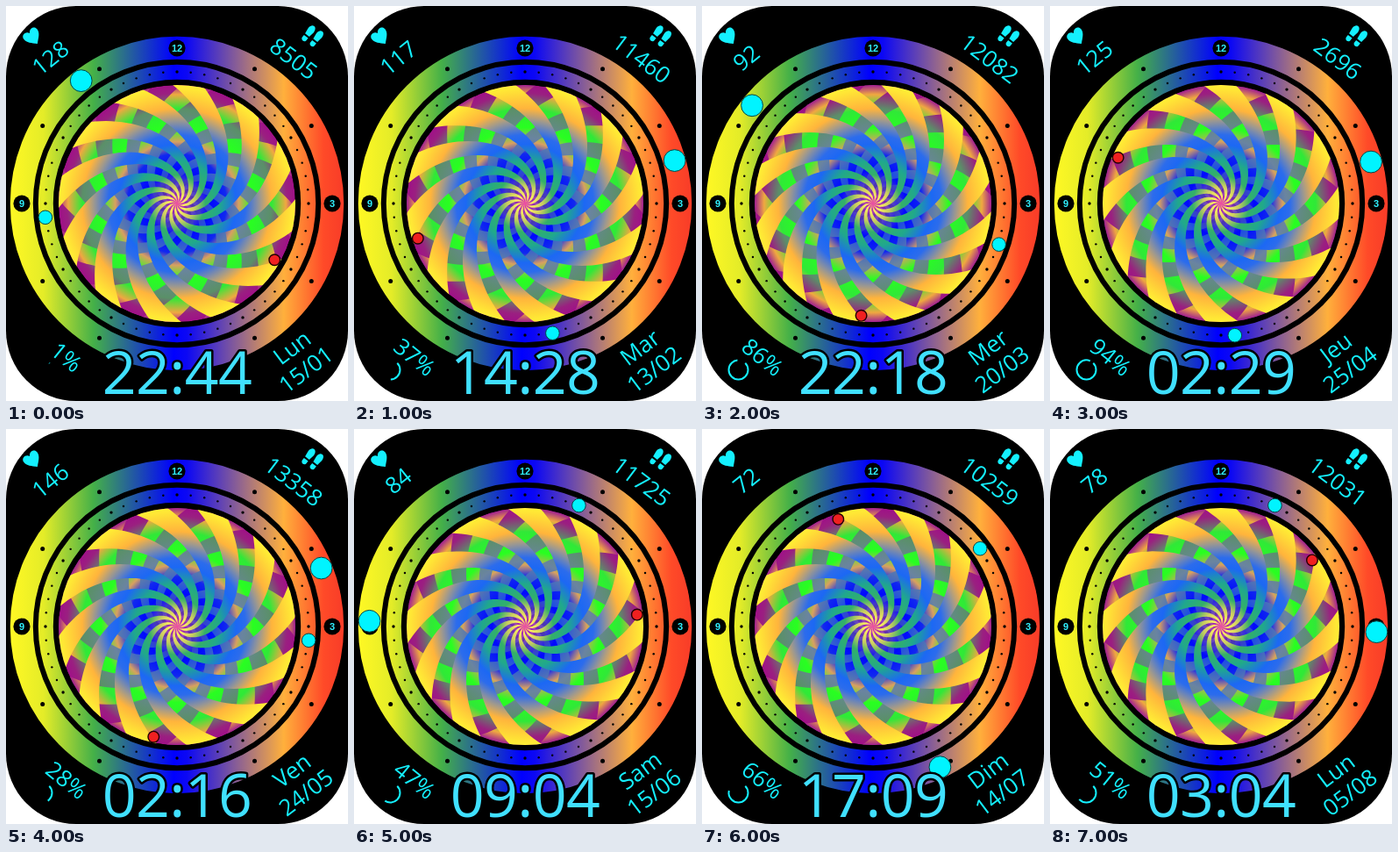
Recreate the animation shown at these times as an HTML page. Size 390 px wide and 450 px high, loop 8000 ms.

```html
<!DOCTYPE html>
<html lang="fr">
<head>
<meta charset="utf-8">
<title>Watch face</title>
<style>
  html, body { margin: 0; width: 100%; height: 100%; overflow: hidden; background: #fff; }
  svg { display: block; width: 390px; height: 450px; }
  text { font-family: "Open Sans", "Noto Sans", sans-serif; text-anchor: middle; }
  .info { font-size: 26px; fill: #14f0ff; }
  .mark { font: bold 11px Arial, "Liberation Sans", sans-serif; fill: #30f0ff; }
  #time { font-size: 68px; letter-spacing: -.6px; fill: #40e0ff; stroke: #000; stroke-width: 5px; stroke-linejoin: round; paint-order: stroke; }
</style>
</head>
<body>
<svg viewBox="0 0 390 450">
  <defs>
    <linearGradient id="rainbow" gradientUnits="userSpaceOnUse" x1="5" y1="0" x2="385" y2="0">
      <stop offset="0" stop-color="#fff824"/>
      <stop offset=".1" stop-color="#e4ec28"/>
      <stop offset=".25" stop-color="#44b048"/>
      <stop offset=".49" stop-color="#0000ff"/>
      <stop offset=".53" stop-color="#0c08f4"/>
      <stop offset=".82" stop-color="#ffb03c"/>
      <stop offset=".94" stop-color="#ff4a28"/>
      <stop offset="1" stop-color="#f83c28"/>
    </linearGradient>
    <radialGradient id="base" gradientUnits="userSpaceOnUse" cx="0" cy="0" r="135">
      <stop offset="0" stop-color="#e020b0"/>
      <stop offset=".14" stop-color="#5030b0"/>
      <stop offset=".3" stop-color="#2050e0"/>
      <stop offset=".55" stop-color="#6a84a0"/>
      <stop offset=".8" stop-color="#5a9068"/>
      <stop offset=".93" stop-color="#9a2080"/>
      <stop offset="1" stop-color="#a01088"/>
    </radialGradient>
    <radialGradient id="under" gradientUnits="userSpaceOnUse" cx="0" cy="0" r="135">
      <stop offset="0" stop-color="#f040a0"/>
      <stop offset=".15" stop-color="#6048c0"/>
      <stop offset=".28" stop-color="#0008ff"/>
      <stop offset=".42" stop-color="#1028f0"/>
      <stop offset=".52" stop-color="#d8a060"/>
      <stop offset=".64" stop-color="#28ff20"/>
      <stop offset=".8" stop-color="#30e838"/>
      <stop offset=".92" stop-color="#f0a840"/>
      <stop offset="1" stop-color="#a02090"/>
    </radialGradient>
    <radialGradient id="over" gradientUnits="userSpaceOnUse" cx="0" cy="0" r="135">
      <stop offset="0" stop-color="#f060a0"/>
      <stop offset=".06" stop-color="#fff060"/>
      <stop offset=".15" stop-color="#c8cc60"/>
      <stop offset=".24" stop-color="#34b068"/>
      <stop offset=".36" stop-color="#20a88c"/>
      <stop offset=".5" stop-color="#1c68f4"/>
      <stop offset=".58" stop-color="#2c6cec"/>
      <stop offset=".7" stop-color="#9c9890"/>
      <stop offset=".8" stop-color="#ffb43c"/>
      <stop offset="1" stop-color="#fff034"/>
    </radialGradient>
    <clipPath id="disc"><circle r="135"/></clipPath>
  </defs>

  <rect width="390" height="450" rx="80"/>

  <g transform="translate(195 225)">
    <circle r="177.2" fill="none" stroke="url(#rainbow)" stroke-width="26" id="outer"/>
    <circle r="149.7" fill="none" stroke="url(#rainbow)" stroke-width="17" id="inner"/>
    <g id="dots"></g>
    <g clip-path="url(#disc)">
      <circle r="135" fill="url(#base)"/>
      <path id="back" fill="url(#under)"/>
      <path id="front" fill="url(#over)"/>
    </g>
    <circle id="sec" r="6.3" fill="#f02020" stroke="#200" stroke-width="1.4"/>
    <circle id="min" r="7.8" fill="#00f4ff" stroke="#044" stroke-width="1"/>
    <circle id="hour" r="12.4" fill="#00f4ff" stroke="#044" stroke-width="1"/>
  </g>

  <g fill="#14f0ff">
    <path transform="translate(30 35) rotate(-36)" d="M0 10C-5 5-9.500 2-9.500-3.500C-9.500-9-2.500-10 0-5C2.500-10 9.500-9 9.500-3.500C9.500 2 5 5 0 10Z"/>
    <g transform="translate(349 35) rotate(38)">
      <path id="shoe" transform="translate(-5.500 -1)" d="M-4-4C-4-12 4-12 4-4L3 3H-3ZM-3 5H3V8C3 12-3 12-3 8Z"/>
      <path transform="translate(5.500 -2)" d="M-4-4C-4-12 4-12 4-4L3 3H-3ZM-3 5H3V8C3 12-3 12-3 8Z"/>
    </g>
  </g>
  <circle id="ring" r="11" transform="translate(41.500 414.500) rotate(-45)" pathLength="100" fill="none" stroke="#14f0ff" stroke-width="2"/>
  <g class="info">
    <text id="pulse" transform="translate(50.500 59) rotate(-39)" y="9.300"></text>
    <text id="steps" transform="translate(328 60) rotate(37)" y="9.300"></text>
    <text id="power" transform="translate(69 400) rotate(39)" y="9.300"></text>
    <text id="day" transform="translate(326 389) rotate(-37)" y="9.300"></text>
    <text id="date" transform="translate(342 414) rotate(-37)" y="9.300"></text>
  </g>
  <text id="time" x="195" y="442"></text>
</svg>

<script>
const $ = id => document.getElementById(id);
const TURN = 2 * Math.PI, ARMS = 12, STEP = 1000;

// time, seconds, pulse, steps, day, date, battery
const states = [
  ['22:44', 20, 128, 8505, 'Lun', '15/01', 1],
  ['14:28', 42, 117, 11460, 'Mar', '13/02', 37],
  ['22:18', 31, 92, 12082, 'Mer', '20/03', 86],
  ['02:29', 49, 125, 2696, 'Jeu', '25/04', 94],
  ['02:16', 32, 146, 13358, 'Ven', '24/05', 28],
  ['09:04', 14, 84, 11725, 'Sam', '15/06', 47],
  ['17:09', 57, 72, 10259, 'Dim', '14/07', 66],
  ['03:04', 9, 78, 12031, 'Lun', '05/08', 51]
];

// Clock position: a is a fraction of a full turn from 12 o'clock.
const polar = (r, a) => [r * Math.sin(a * TURN), -r * Math.cos(a * TURN)];

function put(el, r, a) {
  const [x, y] = polar(r, a);
  el.setAttribute('cx', x.toFixed(2));
  el.setAttribute('cy', y.toFixed(2));
}

function add(tag, attrs, text = '') {
  const el = document.createElementNS('http://www.w3.org/2000/svg', tag);
  for (const k in attrs) el.setAttribute(k, attrs[k]);
  el.textContent = text;
  $('dots').append(el);
  return el;
}

// Wedges twisted along a spiral that straightens at the centre.
function swirl(dir, width) {
  const bend = r => -dir * 1.35 * Math.log(1 + r / 22) / TURN;
  const point = (r, a) => polar(r, a + bend(r)).map(v => v.toFixed(1)).join(' ');
  let d = '';
  for (let i = 0; i < ARMS; i++) {
    const pts = [];
    for (let r = 0; r <= 144; r += 4) pts.push(point(r, i / ARMS));
    for (let r = 144; r > 0; r -= 4) pts.push(point(r, (i + width) / ARMS));
    d += 'M' + pts.join('L') + 'Z';
  }
  return d;
}

function buildDial() {
  $('rainbow').setAttribute('gradientTransform', 'translate(-195 0)');
  for (let i = 0; i < 60; i++) put(add('circle', { r: i % 5 ? 1.2 : 1.7 }), 150, i / 60);
  for (let h = 1; h <= 12; h++) {
    if (h === 6) continue;
    const big = h % 3 === 0;
    put(add('circle', { r: big ? 9.6 : 2.5 }), 177, h / 12);
    if (big) {
      const [x, y] = polar(177, h / 12);
      add('text', { x, y: y + 4, class: 'mark' }, h);
    }
  }
  $('front').setAttribute('d', swirl(1, .52));
  $('back').setAttribute('d', swirl(-1, .5));
}

function show([time, sec, pulse, steps, day, date, power]) {
  const [h, m] = time.split(':').map(Number);
  put($('hour'), 177.5, (h % 12 + m / 60) / 12);
  put($('min'), 151, m / 60);
  put($('sec'), 128.5, sec / 60);
  $('front').setAttribute('transform', `rotate(${sec * 6})`);
  $('back').setAttribute('transform', `rotate(${-sec * 6})`);
  $('ring').setAttribute('stroke-dasharray', `${power} 100`);
  const labels = { time, pulse, steps, day, date, power: power + '%' };
  for (const id in labels) $(id).textContent = labels[id];
}

let current = -1;
function frame() {
  const i = Math.floor(performance.now() / STEP) % states.length;
  if (i !== current) show(states[current = i]);
  requestAnimationFrame(frame);
}

buildDial();
frame();
</script>
</body>
</html>
```
